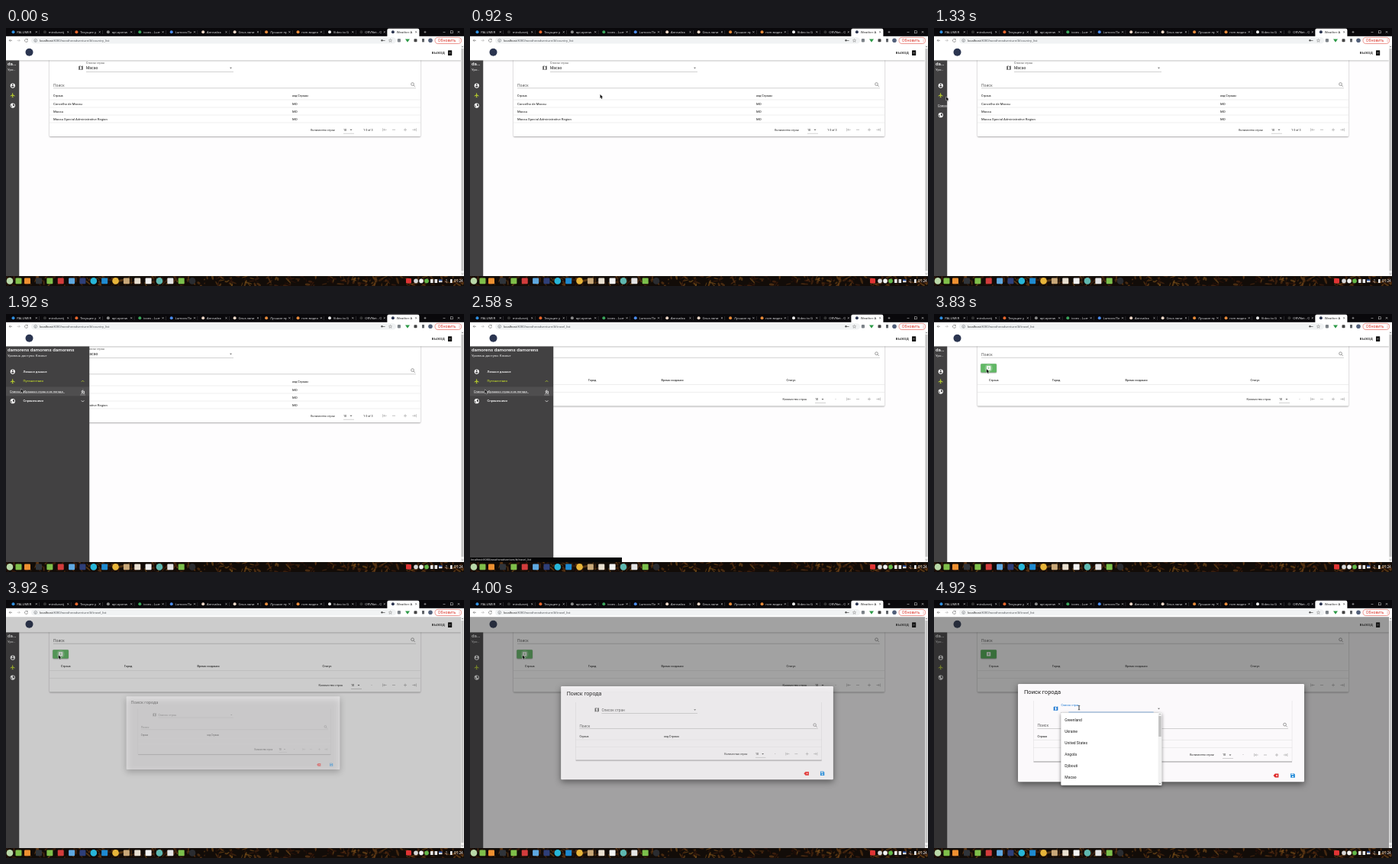
These frames come from a looping animation (600 px wide and 338 px high, 5.01 s). An HTML page with a canvas:

```html
<!DOCTYPE html>
<html lang="ru">
<head>
<meta charset="utf-8">
<title>Weather Adventure</title>
<style>
html, body { margin: 0; width: 100%; height: 100%; overflow: hidden; background: #fff; }
canvas { display: block; width: 600px; height: 338px; }
</style>
</head>
<body>
<canvas id="stage"></canvas>
<script>
const W = 600, H = 338, LOOP = 5010, STEP = 250 / 3;
const UI = 'Roboto, sans-serif', CHROME = '"Noto Sans", sans-serif';
const GREY = '#5c5c5c', INK = '#1c1c1c', LIME = '#b9cf2c', BLUE = '#1976d2';
const canvas = document.getElementById('stage');
const ctx = canvas.getContext('2d');
const dpr = Math.max(1, window.devicePixelRatio || 1);
canvas.width = W * dpr;
canvas.height = H * dpr;

// Icons on a 24-unit grid
const ICONS = {
  caret: 'M7 10L12 15L17 10Z',
  up: 'M6 15L12 9L18 15',
  down: 'M6 9L12 15L18 9',
  search: 'M15.5 9.5A6 6 0 1 1 3.5 9.5A6 6 0 1 1 15.5 9.5M14 14L20 20',
  map: 'M3 5L9 3L15 5L21 3V19L15 21L9 19L3 21ZM9 5V17L15 19V7Z',
  plane: 'M21 16V14L13 9V3.5A1.5 1.5 0 0 0 10 3.5V9L2 14V16L10 13.5V19L8 20.5V22L11.5 21L15 22V20.5L13 19V13.5Z',
  person: 'M12 2A10 10 0 1 0 12 22A10 10 0 1 0 12 2M12 5A3 3 0 1 1 12 11A3 3 0 1 1 12 5M6 16C6 14 10 13 12 13S18 14 18 16C15 20 9 20 6 16Z',
  globe: 'M12 2A10 10 0 1 0 12 22A10 10 0 1 0 12 2M4 11L9 14V19C6 18 4 15 4 12ZM13 5L18 6L19 14L16 15L12 11Z',
  hiker: 'M13 3V5M12 8L10 14L14 17V22M10 14L7 22M12 9L17 12M18 10V22M9 8L7 13',
  first: 'M4 5V19M21 12H8M13 7L8 12L13 17',
  minus: 'M5 12H19',
  plus: 'M12 5V19M5 12H19',
  last: 'M20 5V19M3 12H16M11 7L16 12L11 17',
  addBox: 'M3 3H21V21H3ZM11 7V11H7V13H11V17H13V13H17V11H13V7Z',
  erase: 'M23 4H8L1 12L8 20H23Z',
  cross: 'M6 6L18 18M18 6L6 18',
  save: 'M3 3H17L21 7V21H3ZM6 5V9H15V5ZM12 13A3 3 0 1 0 12 19A3 3 0 1 0 12 13Z',
  back: 'M20 12H5M11 6L5 12L11 18',
  forward: 'M4 12H19M13 6L19 12L13 18',
  reload: 'M18 7A8 8 0 1 0 20 13M19 3V8H14',
  star: 'M12 3L15 9L21 10L16.5 14L18 21L12 17L6 21L7.5 14L3 10L9 9Z'
};
for (const k in ICONS) ICONS[k] = new Path2D(ICONS[k]);

function rect(x, y, w, h, color) {
  ctx.fillStyle = color;
  ctx.fillRect(x, y, w, h);
}
function round(x, y, w, h, r, color) {
  ctx.fillStyle = color;
  ctx.beginPath();
  ctx.roundRect(x, y, w, h, r);
  ctx.fill();
}
function dot(x, y, r, color) {
  ctx.fillStyle = color;
  ctx.beginPath();
  ctx.arc(x, y, r, 0, Math.PI * 2);
  ctx.fill();
}
function hline(x1, x2, y, color = '#8f8f8f', h = 0.4) {
  rect(x1, y - h / 2, x2 - x1, h, color);
}
function setFont(size, weight = 400, family = UI) {
  ctx.font = `${weight} ${size}px ${family}`;
}
// y is the middle of the line
function text(s, x, y, size, color = INK, weight = 400, family = UI) {
  setFont(size, weight, family);
  ctx.fillStyle = color;
  ctx.fillText(s, x, y + size * 0.35);
}
function ellipsis(s, width) {
  if (ctx.measureText(s).width <= width) return s;
  while (s && ctx.measureText(s + '…').width > width) s = s.slice(0, -1);
  return s.trimEnd() + '…';
}
function icon(name, x, y, color, size = 7.5, stroke = 0) {
  ctx.save();
  ctx.translate(x - size / 2, y - size / 2);
  ctx.scale(size / 24, size / 24);
  if (stroke) {
    ctx.strokeStyle = color;
    ctx.lineWidth = stroke;
    ctx.stroke(ICONS[name]);
  } else {
    ctx.fillStyle = color;
    ctx.fill(ICONS[name], 'evenodd');
  }
  ctx.restore();
}
function shadow(draw, blur = 2, dy = 0.8, alpha = 0.4) {
  ctx.save();
  ctx.shadowColor = `rgba(0,0,0,${alpha})`;
  ctx.shadowBlur = blur * dpr;
  ctx.shadowOffsetY = dy * dpr;
  draw();
  ctx.restore();
}
function clipTo(x, y, w, h, draw) {
  ctx.save();
  ctx.beginPath();
  ctx.rect(x, y, w, h);
  ctx.clip();
  draw();
  ctx.restore();
}

const clamp = v => Math.min(1, Math.max(0, v));
function bezier(x1, y1, x2, y2) {
  const at = (a, b, u) => 3 * a * u * (1 - u) ** 2 + 3 * b * u * u * (1 - u) + u ** 3;
  return x => {
    if (x <= 0 || x >= 1) return clamp(x);
    let lo = 0, hi = 1;
    for (let i = 0; i < 20; i++) {
      const m = (lo + hi) / 2;
      if (at(x1, x2, m) < x) lo = m; else hi = m;
    }
    return at(y1, y2, lo);
  };
}
const standard = bezier(0.4, 0, 0.2, 1), swift = bezier(0.25, 0.8, 0.25, 1);
const smooth = v => v * v * (3 - 2 * v);
const phase = (t, start, length) => clamp((t - start) / length);

function seeded(seed) {
  return () => (seed = (seed * 16807) % 2147483647) / 2147483647;
}

const TABS = [
  ['PALUMER', '#2f8fe0'], ['mirolunetj', '#333'], ['Текущие у', '#e8662c'], ['api.openw', '#8a8a8a'],
  ['icons - Lum', '#3ba55b'], ['Lumora Пл', '#4b8cf0'], ['Английск', '#f0d8c8'], ['Gnus запи', '#f0d8c8'],
  ['Лучшие пр', '#e88b3a'], ['rom видео', '#e88b3a'], ['Video to G', '#eee'], ['ORVNet - OR', '#333'],
  ['Weather A', '#2b3550']
];

function browser(path) {
  rect(0, 0, W, 11, '#09080b');
  TABS.forEach(([name, color], i) => {
    const x = 4 + i * 41.45, active = i === TABS.length - 1;
    if (active) round(x - 2, 0.8, 42, 11, [2, 2, 0, 0], '#fff');
    else rect(x + 39.5, 3, 0.4, 5, '#55555a');
    dot(x + 5.5, 5.3, 2, color);
    clipTo(x + 10, 0, 22, 11, () => text(name, x + 10.3, 5.3, 4.2, active ? '#222' : '#dedee0', 400, CHROME));
    icon('cross', x + 35.8, 5.3, active ? '#333' : '#e4e4e4', 4.2, 3);
  });
  icon('plus', 549, 5.3, '#ddd', 5, 2.6);
  icon('minus', 574, 5.5, '#ddd', 5, 2.4);
  ctx.strokeStyle = '#ddd';
  ctx.lineWidth = 0.5;
  ctx.strokeRect(582.5, 3.8, 3, 3);
  icon('cross', 593, 5.3, '#ddd', 5, 2.6);

  rect(0, 10.8, W, 11.4, '#fff');
  icon('back', 6, 16.3, '#555', 6, 2.2);
  icon('forward', 16.5, 16.3, '#aaa', 6, 2.2);
  icon('reload', 26.5, 16.3, '#555', 6, 2.2);
  round(33, 12.2, 478, 8.4, 4.2, '#f1f3f4');
  ctx.strokeStyle = '#5f6368';
  ctx.lineWidth = 0.5;
  ctx.beginPath();
  ctx.arc(38.7, 16.4, 1.9, 0, 7);
  ctx.stroke();
  rect(38.4, 16, 0.6, 1.5, '#5f6368');
  const host = 'localhost';
  text(host, 44, 16.4, 4.05, '#222', 400, CHROME);
  const w = ctx.measureText(host).width;
  text(':8080/weatheradventure/#/' + path, 44 + w, 16.4, 4.05, '#54585c', 400, CHROME);
  dot(492.5, 16.3, 1.2, '#555');
  rect(493, 16, 3.6, 0.7, '#555');
  icon('star', 503.5, 16.3, '#666', 5.5, 1.8);
  round(512.8, 14, 4.2, 4.4, 1, '#7c8288');
  ctx.fillStyle = '#2c9a47';
  ctx.beginPath();
  ctx.moveTo(523, 14.4); ctx.lineTo(529, 14.4); ctx.lineTo(526, 18.8);
  ctx.fill();
  round(534.5, 14.2, 4, 4, 0.8, '#444');
  rect(545, 14, 3, 4.4, '#5f6368');
  dot(556, 16.2, 2.8, '#52607a');
  ctx.strokeStyle = '#d93025';
  ctx.lineWidth = 0.5;
  ctx.beginPath();
  ctx.roundRect(562, 12.3, 34.5, 8.2, 4.1);
  ctx.stroke();
  text('Обновить', 565.8, 16.3, 4.8, '#d93025', 400, CHROME);
  for (const y of [14.6, 16.3, 18]) dot(594, y, 0.45, '#d93025');
}

function scrollbar() {
  rect(596, 22, 4, 303, '#f1f1f1');
  rect(596.5, 27, 3, 291, '#c4c4c4');
  icon('up', 598, 24.5, '#666', 4, 4);
  icon('down', 598, 322, '#666', 4, 4);
}

function appBar() {
  shadow(() => rect(0, 22, 596, 20.3, '#fff'), 2, 0.7, 0.3);
  dot(30.5, 31.8, 5, '#2b3550');
  ctx.letterSpacing = '0.35px';
  text('ВЫХОД', 557.8, 32.5, 4.4, '#111', 500);
  ctx.letterSpacing = '0px';
  round(579, 29.3, 5.2, 6.6, 0.5, '#111');
  icon('forward', 581.3, 32.6, '#fff', 3.2, 3);
}

function field(x1, x2, y) {
  text('Поиск', x1, y, 5, GREY);
  icon('search', x2 - 3.7, y - 0.7, '#666', 7.5, 2);
  hline(x1, x2, y + 3.9);
}
// Table footer: label start, page-size start, range text and the four arrows
function footer(label, size, range, rangeX, arrows, y) {
  text('Количество строк', label, y, 3.75, '#222');
  text('10', size, y, 3.75, '#222');
  icon('caret', size + 10, y, '#555', 7);
  hline(size, size + 14, y + 4.8);
  text(range, rangeX, y, 3.75, '#222');
  ['first', 'minus', 'plus', 'last'].forEach((n, i) => icon(n, arrows[i], y, '#9a9a9a', 7, 2));
}
const ARROWS = [496, 508, 523, 535];

function card(bottom) {
  shadow(() => round(57, 38, 486, bottom - 38, 1, '#fff'));
}

function countryPage() {
  card(142);
  text('Список стран', 105, 46, 3.75, GREY);
  icon('map', 98, 52.3, '#666');
  text('Macao', 105, 52.3, 5);
  icon('caret', 294.5, 52.3, '#666');
  hline(105, 298, 57.2);
  field(62, 537, 75);
  text('Страна', 62, 89, 3.75, '#333', 500);
  text('код Страны', 375, 89, 3.75, '#333', 500);
  hline(57, 543, 94, '#d4d4d4');
  ['Concelho de Macau', 'Macau', 'Macau Special Administrative Region'].forEach((name, i) => {
    const y = 99 + i * 10;
    text(name, 62, y, 4.3);
    text('MO', 375, y, 4.3);
    hline(57, 543, y + 5, '#d4d4d4');
  });
  footer(399, 442, '1-3 of 3', 468, ARROWS, 133.3);
}

function travelPage(t) {
  card(120.5);
  field(62, 537, 53.2);
  shadow(() => round(61.3, 65.2, 20.6, 11.4, 1, '#4caf50'), 1.5, 0.6);
  if (t > 3600 && t < 4100) {
    round(61.3, 65.2, 20.6, 11.4, 1, 'rgba(255,255,255,0.12)');
    if (t > 3800) dot(71.6, 70.9, 5, 'rgba(255,255,255,0.25)');
  }
  icon('addBox', 71.6, 70.9, '#fff', 7);
  const heads = { 'Страна': 72, 'Город': 155, 'Время создания': 250.5, 'Статус': 414.5 };
  for (const h in heads) text(h, heads[h], 87, 3.75, '#333', 500);
  hline(57, 543, 92.3, '#d4d4d4');
  hline(57, 543, 102.2, '#d4d4d4');
  footer(409.5, 452, '-', 478.5, ARROWS, 111.5);
}

function drawer(t) {
  const open = t > 1330 && t < 2945;
  const wide = standard(phase(t, 1335, 200)) - standard(phase(t, 2949, 200));
  const w = 17.5 + 92 * wide;
  clipTo(0, 42.3, w, 283, () => {
    rect(0, 42.3, w, 283, '#424142');
    setFont(6.25, 500);
    text(ellipsis('damorens damorens damorens', w - 4.2), 2, 46.7, 6.25, '#fff', 500);
    setFont(4.375);
    text(ellipsis('Уровень доступа: Клиент', w - 4.7), 2, 54, 4.375, '#eee');
    icon('person', 8.8, 75.5, '#fff');
    icon('plane', 8.8, 88.2, LIME);
    icon('globe', 8.8, open ? 114.2 : 101.5, '#fff');
    if (!open) return;
    text('Личные данные', 22.5, 75.3, 4.1, '#fff', 500);
    text('Путешествия', 22.5, 88, 4.2, LIME, 500);
    icon('up', 100.5, 88, LIME, 7, 2.6);
    if (t > 1800) rect(0, 95.5, w, 11.8, 'rgba(255,255,255,0.07)');
    text('Список избранных стран и их погода', 5, 101.5, 4, '#fff');
    hline(5, 77, 103.8, '#ddd', 0.35);
    icon('hiker', 100.5, 101.5, '#fff', 7.5, 2.4);
    hline(97, 104, 106, '#ddd', 0.4);
    text('Справочники', 22.5, 114, 4.2, '#fff', 500);
    icon('down', 100.5, 114.2, '#fff', 7, 2.6);
  });
}

function dialog(t) {
  const p = swift(phase(t, 3870, 300));
  if (!p) return;
  ctx.save();
  rect(0, 22, 596, 303, `rgba(33,33,33,${0.46 * p})`);
  ctx.globalAlpha = p;
  ctx.translate(297.5, 174);
  ctx.scale(0.5 + p / 2, 0.5 + p / 2);
  ctx.translate(-297.5, -174);
  shadow(() => round(110, 110, 375, 128.3, 1.3, '#fbf9fb'), 8, 3, 0.5);
  text('Поиск города', 118, 120, 7.5, INK);
  // Inner card: sides and bottom edge, its top is scrolled away
  for (const x of [130.2, 468.8]) rect(x, 132, 0.5, 79.5, 'rgba(0,0,0,0.12)');
  hline(130.5, 469, 211.8, 'rgba(0,0,0,0.4)', 0.7);
  hline(130.5, 469, 212.6, 'rgba(0,0,0,0.15)', 0.9);
  const focus = t > 4800;
  icon('map', 159.5, 142.3, focus ? BLUE : '#666');
  if (focus) text('Список стран', 166.5, 138, 3.75, BLUE);
  else text('Список стран', 166, 142.3, 5, GREY);
  icon('caret', 294.5, 142.3, '#666');
  hline(166, 298, 147.2);
  if (focus) {
    const half = 66 * standard(phase(t, 4810, 190));
    hline(232 - half, 232 + half, 147.1, BLUE, 0.7);
  }
  field(135.5, 464, 164.6);
  text('Страна', 135.5, 178.5, 3.75, '#333', 500);
  text('код Страны', 252, 178.5, 3.75, '#333', 500);
  hline(130.5, 469, 183.5, '#d4d4d4');
  hline(130.5, 469, 193.3, '#d4d4d4');
  footer(335, 378, '-', 404.5, [422, 434, 449, 460.5], 203);
  icon('erase', 448, 230, '#e02b2b');
  icon('cross', 449, 230, '#fff', 3.6, 5);
  icon('save', 470, 230, '#1e88d8');
  ctx.restore();
}

function menu(t) {
  const p = phase(t, 4770, 130);
  if (!p) return;
  ctx.save();
  ctx.globalAlpha = p;
  shadow(() => round(166.3, 147.4, 132, 95.3, 1, '#fff'), 4, 1.8, 0.5);
  ['Greenland', 'Ukraine', 'United States', 'Angola', 'Djibouti', 'Macao']
    .forEach((s, i) => text(s, 171.3, 157.4 + i * 15.03, 5));
  rect(293.6, 147.4, 4.7, 95.3, '#f1f1f1');
  rect(294.2, 152, 3.5, 27, '#c1c1c1');
  icon('up', 296, 149.8, '#777', 4, 4);
  icon('down', 296, 240.3, '#444', 4, 4);
  ctx.restore();
}

const DOCK = ['#b9d8a8', '#7fbf4a', '#ef9030', '#30343a', '#7fbf4a', '#d23c3c', '#5fa8e0', '#2e3f78', '#27b6d8',
  '#1f8ad0', '#e8b53a', '#c9a878', '#e8dfd0', '#f2f2f2', '#5fb8b0', '#e4e4e4', '#7cc04c', '#2a2c30'];
const ROUND_ICONS = [0, 8, 10, 14, 17];

function taskbar() {
  clipTo(0, 325, W, 13, () => {
    rect(0, 325, W, 13, '#120c08');
    const rnd = seeded(77);
    for (let i = 0; i < 320; i++) {
      const x = rnd() * W, y = 325 + rnd() * 13, warm = rnd();
      ctx.fillStyle = `hsla(${14 + warm * 20},65%,${8 + warm * 24}%,0.6)`;
      ctx.beginPath();
      ctx.ellipse(x, y, 1 + rnd() * 4, 0.5 + rnd(), rnd() * 3, 0, 7);
      ctx.fill();
    }
  });
  DOCK.forEach((color, i) => {
    const x = i < 3 ? 5 + i * 11.5 : 43 + (i - 3) * 14.36;
    if (ROUND_ICONS.includes(i)) dot(x, 331.4, 4.3, color);
    else round(x - 4, 327.6, 8, 7.6, 1, color);
  });
  round(524, 328, 7, 6.5, 1.2, '#e03434');
  [537, 544, 551].forEach((x, i) => dot(x, 331.4, 2.8, ['#d8d8d8', '#f2f2f2', '#63b84a'][i]));
  [556, 561.5].forEach(x => round(x, 329, 3.6, 5, 0.5, '#e6e6e6'));
  rect(567, 329.5, 4.5, 1.7, '#3465c0');
  rect(567, 331.2, 4.5, 2, '#e8e8e8');
  text('♫', 574.5, 331.3, 5, '#eee', 400, '"DejaVu Sans", sans-serif');
  round(582, 329, 2.6, 5, 0.5, '#eee');
  text('01:24', 587, 331.4, 4.6, '#fff', 400, CHROME);
}

function statusBar(t) {
  if (t < 2050 || t > 3060) return;
  rect(0, 319, 199, 6.3, '#060607');
  text('localhost:8080/weatheradventure/#/travel_list', 1, 322, 3.4, '#eee', 400, '"DejaVu Sans", sans-serif');
}

// Pointer stops: time, x, y
const PATH = [[300, 330, 335], [920, 170.5, 87], [1370, 13, 90], [1900, 19.5, 98], [2750, 19.5, 99],
  [3000, 210, 115], [3600, 68.8, 72], [4060, 68.8, 72], [4660, 190, 141.3]];

function pointer(t) {
  if (t < PATH[0][0]) return;
  let [, x, y] = PATH[PATH.length - 1];
  for (let i = 1; i < PATH.length; i++) {
    const [t0, x0, y0] = PATH[i - 1], [t1, x1, y1] = PATH[i];
    if (t >= t1) continue;
    const k = smooth((t - t0) / (t1 - t0));
    x = x0 + (x1 - x0) * k;
    y = y0 + (y1 - y0) * k;
    break;
  }
  if (t > 4600) {
    rect(x - 0.4, y - 2.6, 0.8, 5.2, '#111');
    rect(x - 1.3, y - 2.8, 2.6, 0.5, '#111');
    rect(x - 1.3, y + 2.3, 2.6, 0.5, '#111');
    return;
  }
  ctx.save();
  ctx.translate(x, y);
  ctx.beginPath();
  [[0, 0], [0, 5], [1.1, 4], [1.9, 5.9], [2.8, 5.5], [2, 3.7], [3.5, 3.6]].forEach(p => ctx.lineTo(...p));
  ctx.closePath();
  ctx.strokeStyle = '#fff';
  ctx.lineWidth = 0.6;
  ctx.stroke();
  ctx.fillStyle = '#111';
  ctx.fill();
  ctx.restore();
}

function draw(now) {
  const t = Math.min(59, Math.floor((now % LOOP + 4) / STEP)) * STEP;
  const travel = t > 2300;
  ctx.setTransform(dpr, 0, 0, dpr, 0, 0);
  rect(0, 0, W, H, '#fff');
  rect(0, 22, 596, 303, '#fefdfe');
  if (travel) travelPage(t); else countryPage();
  appBar();
  drawer(t);
  dialog(t);
  menu(t);
  scrollbar();
  browser(travel ? 'travel_list' : 'country_list');
  statusBar(t);
  taskbar();
  pointer(t);
}

const begin = performance.now();
function tick() {
  draw(performance.now() - begin);
  requestAnimationFrame(tick);
}
tick();
</script>
</body>
</html>
```
